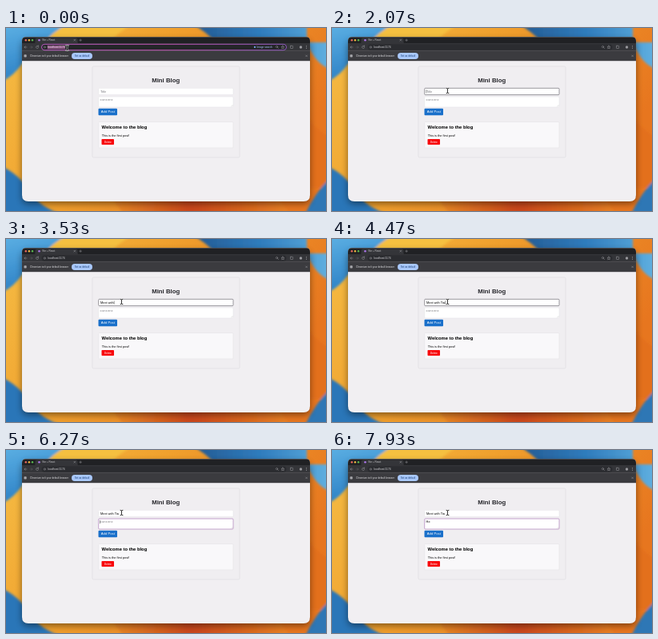
These frames come from a looping animation (400 by 229 pixels, 8 s). An HTML page:

```html
<!DOCTYPE html>
<html lang="en">
<head>
<meta charset="utf-8">
<title>Mini Blog</title>
<style>
html, body { margin: 0; width: 100%; height: 100%; overflow: hidden; background: #ed9a2c }
svg { display: block; width: 100%; height: 100%; font-family: "Liberation Sans", Arial, sans-serif }
text { white-space: pre }
.mono { font-family: "Liberation Mono", monospace }
.icon { fill: none; stroke: #98989d; stroke-width: .5; stroke-linecap: round }
</style>
</head>
<body>
<svg viewBox="0 0 400 229" preserveAspectRatio="none">
  <defs>
    <linearGradient id="petal" x2="1" y2=".4">
      <stop stop-color="#f5bd45"/><stop offset=".45" stop-color="#f0a02d"/><stop offset="1" stop-color="#e7761f"/>
    </linearGradient>
    <linearGradient id="sky" x2=".3" y2="1">
      <stop stop-color="#5fb3e6"/><stop offset="1" stop-color="#2b7fc4"/>
    </linearGradient>
    <linearGradient id="deepSky">
      <stop stop-color="#24588f"/><stop offset=".5" stop-color="#2f7cbd"/><stop offset="1" stop-color="#62b2e2"/>
    </linearGradient>
    <linearGradient id="ember">
      <stop stop-color="#e88a26"/><stop offset=".45" stop-color="#c9461a"/><stop offset="1" stop-color="#e98122"/>
    </linearGradient>
    <linearGradient id="focus">
      <stop stop-color="#b95bc0"/><stop offset=".5" stop-color="#c052b2"/><stop offset="1" stop-color="#8e58bd"/>
    </linearGradient>
    <filter id="soft"><feGaussianBlur stdDeviation="1.5"/></filter>
    <filter id="shade" x="-10%" y="-10%" width="120%" height="125%"><feGaussianBlur stdDeviation="4"/></filter>
    <clipPath id="frame"><path d="M24.500 11.300H375.500Q380 11.300 380 15.800V209Q380 217 372 217H28Q20 217 20 209V15.800Q20 11.300 24.500 11.300Z"/></clipPath>
  </defs>

  <!-- wallpaper -->
  <rect width="400" height="229" fill="url(#petal)"/>
  <g filter="url(#soft)">
    <path d="M-8-8H82Q58 5 48 18L20 45Q8 62-8 68Z" fill="url(#sky)"/>
    <path d="M82-8H165Q140 4 130 18H48Q58 5 82-8Z" fill="#f5c040"/>
    <path d="M228-8Q250 4 262 18H408V52Q388 48 376 18V-8Z" fill="url(#deepSky)"/>
    <path d="M375 110Q390 130 408 138V200H375Z" fill="#e3701f"/>
    <path d="M-8 172Q16 182 30 205T84 237H-8Z" fill="#2a76b8"/>
    <path d="M130 210H335Q350 222 356 237H150Z" fill="url(#ember)"/>
    <path d="M408 185Q386 205 372 237H408Z" fill="#2f77b5"/>
  </g>

  <!-- browser window -->
  <rect x="20" y="15" width="360" height="205" rx="7" opacity=".45" filter="url(#shade)"/>
  <g clip-path="url(#frame)">
    <rect x="20" y="11" width="360" height="207" fill="#f1eff2"/>
    <rect x="20" y="11" width="360" height="8.500" fill="#202124"/>
    <rect x="20" y="19" width="360" height="9.500" fill="#343539"/>
    <rect x="20" y="28.200" width="360" height="13" fill="#3b3b3f"/>
    <path d="M20 28.200H380" stroke="#4a4a4e" stroke-width=".4"/>
    <path d="M35 19.500Q36.500 19.500 36.500 17.500V15Q36.500 12.500 39 12.500H87Q89.500 12.500 89.500 15V17.500Q89.500 19.500 91 19.500Z" fill="#343539"/>
  </g>
  <circle cx="24.800" cy="15.200" r="1.200" fill="#ee6a5f"/>
  <circle cx="28.900" cy="15.200" r="1.200" fill="#f0b73f"/>
  <circle cx="33" cy="15.200" r="1.200" fill="#59b94f"/>
  <circle cx="41.500" cy="15.300" r="1.300" fill="#a974e8"/>
  <text x="45" y="16.300" font-size="3" fill="#c8c8cc">Vite + React</text>
  <g class="icon">
    <path d="M84.900 14.300l1.800 1.800m0-1.800l-1.800 1.800M91.800 15.200h2.600m-1.300-1.300v2.600"/>
    <path d="M26 24h-3m1.200-1.300L23 24l1.200 1.300"/>
    <path d="M30 24h3m-1.200-1.300L33 24l-1.200 1.300" opacity=".4"/>
    <path d="M40.400 23a1.600 1.600 0 1 0 .2 1.500M40.500 21.900v1.300h-1.300"/>
  </g>
  <rect id="urlBox" x="44.500" y="20.300" width="306" height="7.400" rx="3.700"/>
  <g class="icon">
    <circle cx="48.300" cy="24" r="1.100"/>
    <circle cx="338.500" cy="23.500" r="1.100"/><path d="M339.400 24.400l1.100 1.100"/>
    <path d="M346 22l.6 1.400 1.400.1-1.100 1 .4 1.400-1.300-.8-1.300.8.400-1.400-1.100-1 1.400-.1Z"/>
    <rect x="355.500" y="22.300" width="3.200" height="3.200" rx=".5"/>
    <path d="M375.500 22.300v.1m0 1.500v.1m0 1.500v.1" stroke-width=".8"/>
  </g>
  <circle cx="368.500" cy="24" r="1.700" fill="#98989d"/>
  <rect id="selection" x="51.700" y="21.800" width="22.300" height="4.500" fill="#8d5583"/>
  <text x="52.300" y="25.200" font-size="3.300" fill="#dcdce0">localhost:5174</text>
  <g id="searchHint">
    <circle cx="311" cy="23.900" r="1.100" fill="#78a7eb"/>
    <text x="313.500" y="25" font-size="3.200" fill="#a8c7fa">Image search</text>
  </g>
  <rect x="22.500" y="33.200" width="3.200" height="3.200" rx=".7" fill="#a8a8ac"/>
  <text x="30" y="36.200" font-size="3" fill="#e2e2e5">Chromium isn't your default browser</text>
  <rect x="82" y="31" width="26" height="8" rx="4" fill="#a8c7fa"/>
  <text x="95" y="36.100" font-size="3" fill="#173d73" text-anchor="middle">Set as default</text>
  <path class="icon" d="M374.700 34l1.800 1.800m0-1.800l-1.800 1.800"/>

  <!-- page -->
  <rect x="108" y="48" width="184" height="114" rx="1.500" fill="#f0eef1" stroke="#dfdde1" stroke-width=".7"/>
  <text x="199.700" y="68" font-size="7.800" font-weight="bold" fill="#25252a" text-anchor="middle">Mini Blog</text>
  <rect id="titleBox" x="115.700" y="75.300" width="168.300" height="8.300" rx="1" fill="#fff"/>
  <text id="titleText" x="118" y="80.800" font-size="3.900"></text>
  <rect id="contentBox" x="115.700" y="86" width="168.300" height="13" rx="1" fill="#fff"/>
  <text id="contentText" x="117.600" y="91.300" font-size="3.900"></text>
  <path d="M281.300 98.300l2-2m-1 2l1-1" stroke="#aaa" stroke-width=".3"/>
  <rect id="caret" width=".45" height="4.400" fill="#222"/>
  <rect x="115.500" y="100.800" width="23.500" height="8.500" rx="1" fill="#1a70ca"/>
  <text x="127.300" y="106.400" font-size="4.200" fill="#fff" text-anchor="middle">Add Post</text>
  <rect x="115.700" y="117.500" width="168.300" height="32.500" rx="1" fill="#f9f8fa" stroke="#e4e2e6" stroke-width=".6"/>
  <text x="119.600" y="126.400" font-size="5.800" font-weight="bold" fill="#000">Welcome to the blog</text>
  <text x="119.800" y="136.300" font-size="3.900" fill="#000">This is the first post!</text>
  <rect x="119.500" y="139" width="15.500" height="7" rx=".8" fill="#f8090d"/>
  <text x="127.250" y="143.600" font-size="3.200" fill="#fff" text-anchor="middle">Delete</text>

  <g id="pointer" fill="none" stroke-linecap="round">
    <path id="beam" d="M-1.500-3.200Q0-3.200 0-2.300Q0-3.200 1.500-3.200M0-2.300V2.300M-1.500 3.200Q0 3.200 0 2.300Q0 3.200 1.500 3.200"/>
  </g>
</svg>
<script>
const LOOP = 8000;
const TITLE_FOCUS = 1070, CONTENT_FOCUS = 5130;
const TITLE = { text: 'Meet with Tia', start: 2400, step: 130 };
const CONTENT = { text: 'He', start: 7730, step: 140 };

const el = id => document.getElementById(id);
const set = (id, attributes) => {
  for (const [name, value] of Object.entries(attributes)) el(id).setAttribute(name, value);
};
const typed = ({ text, start, step }, t) =>
  text.slice(0, Math.max(0, Math.floor((t - start) / step) + 1));
const ease = x => x * x * (3 - 2 * x);

function showField(id, value, placeholder, placeholderClass = '') {
  el(id).textContent = value || placeholder;
  set(id, { fill: value ? '#000' : '#75757a', class: value ? '' : placeholderClass });
}

function outline(id, focused, color) {
  set(id, { stroke: focused ? color : '#e2e0e4', 'stroke-width': focused ? .65 : .5 });
}

// Dark pointer stroke over a white halo
const halo = el('beam').cloneNode();
halo.removeAttribute('id');
el('pointer').prepend(halo);
halo.setAttribute('stroke', '#fff');
halo.setAttribute('stroke-width', 1.6);
set('beam', { stroke: '#161616', 'stroke-width': .85 });

function draw(now) {
  const t = now % LOOP;
  const urlFocused = t < TITLE_FOCUS;
  const contentFocused = t >= CONTENT_FOCUS;
  const titleFocused = !urlFocused && !contentFocused;
  const title = typed(TITLE, t), content = typed(CONTENT, t);

  set('urlBox', {
    fill: urlFocused ? '#242529' : '#2b2c30',
    stroke: urlFocused ? 'url(#focus)' : 'none',
    'stroke-width': 1
  });
  set('selection', { opacity: +urlFocused });
  set('searchHint', { opacity: +urlFocused });

  showField('titleText', title, 'Title');
  showField('contentText', content, 'Content', 'mono');
  outline('titleBox', titleFocused, '#68636d');
  outline('contentBox', contentFocused, '#a877b5');

  const field = contentFocused ? 'contentText' : 'titleText';
  const value = contentFocused ? content : title;
  const focusTime = contentFocused ? CONTENT_FOCUS : TITLE_FOCUS;
  const left = +el(field).getAttribute('x');
  const caretX = value ? left + el(field).getComputedTextLength() + .2 : left - .3;
  const caretOn = !urlFocused && (t - focusTime) % 1000 < 500;
  set('caret', { x: caretX, y: contentFocused ? 87.8 : 77.3, opacity: +caretOn });

  const move = ease(Math.min(1, Math.max(0, (t - 200) / 750)));
  set('pointer', { transform: `translate(${76.5 + 68 * move} ${25 + 53.5 * move})` });
}

function tick(now) {
  draw(now);
  requestAnimationFrame(tick);
}
draw(0);
requestAnimationFrame(tick);
</script>
</body>
</html>
```
